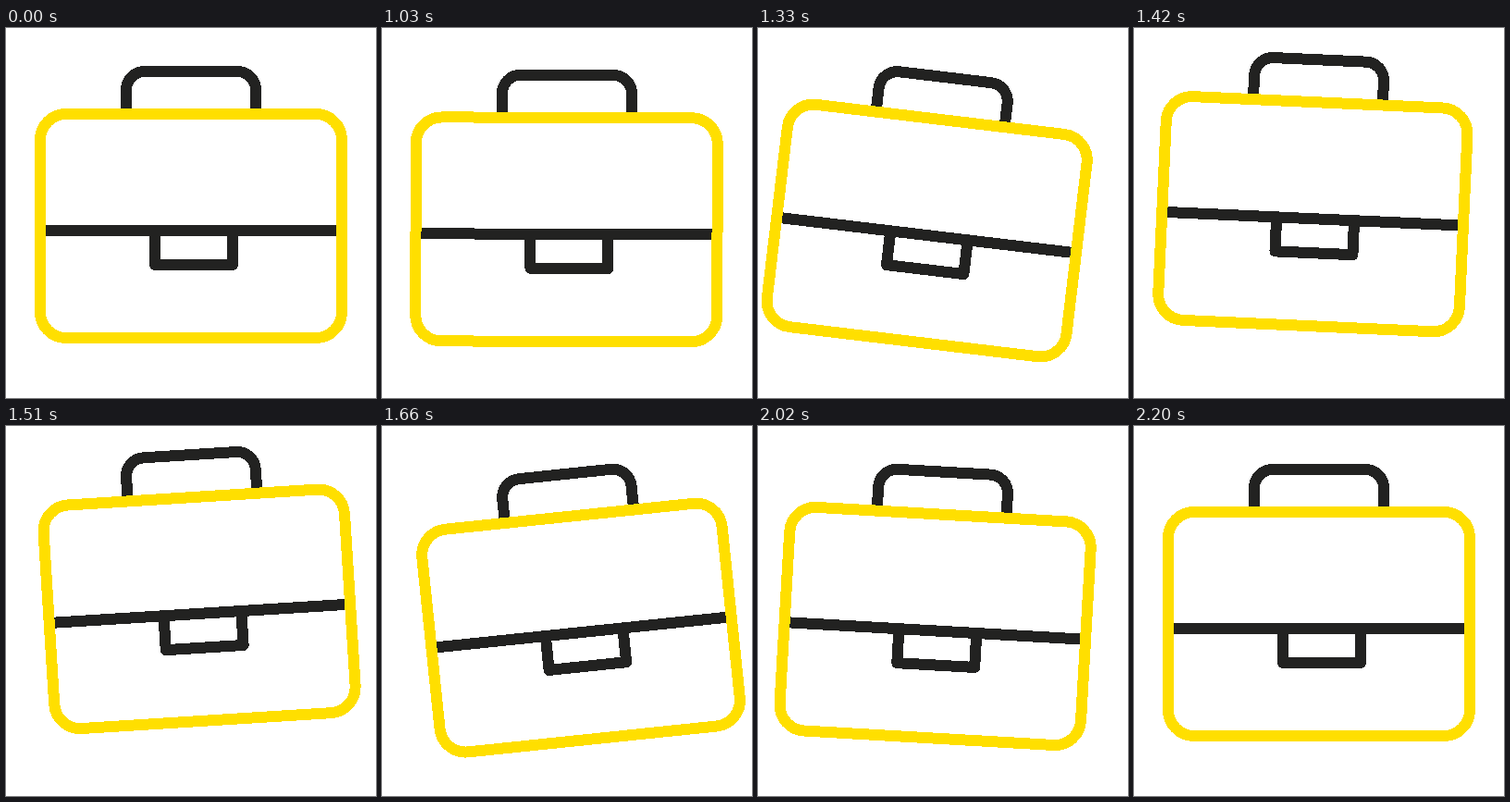
Write an HTML page that moves like this. It is 400 by 400 pixels and loops after 2230 ms.

```html
<!DOCTYPE html>
<html lang="en">
<head>
<meta charset="utf-8">
<title>Briefcase</title>
<style>
  html, body { margin: 0; width: 100%; height: 100%; overflow: hidden; background: #fff; }
  svg { display: block; width: 100%; height: 100%; }
  #case {
    fill: none; stroke: #222221; stroke-width: 12;
    stroke-linecap: round; stroke-linejoin: round;
    shape-rendering: crispEdges;
  }
  .body { stroke: #ffdf00; }
</style>
</head>
<body>
<svg viewBox="0 0 400 400">
  <g id="case">
    <path d="M130 93V67a20 20 0 0 1 20-20H250a20 20 0 0 1 20 20V93"/>
    <path d="M37 219H363"/>
    <path d="M161 219V256H245V219"/>
    <rect class="body" x="37" y="93" width="326" height="242" rx="28"/>
  </g>
</svg>
<script>
  const LOOP = 2230, START = 1030, STEP = 30;

  // [time in ms, value]
  const angle = [[1000, 0], [1310, 7], [1605, -7], [1903, 5], [2200, 0]];
  const drop = [[1004, 0], [1140, 40], [1477, -17], [1772, 15.3], [2110, 0]];

  const ease = p => p * p * (3 - 2 * p);

  function valueAt(keys, t) {
    const i = keys.findIndex(k => k[0] > t);
    if (i < 1) return 0;
    const [t0, a] = keys[i - 1], [t1, b] = keys[i];
    return a + (b - a) * ease((t - t0) / (t1 - t0));
  }

  const bag = document.getElementById('case');
  const begin = performance.now();

  function draw(now) {
    const t = Math.max(0, now - begin) % LOOP;
    // the motion advances in fixed steps after a still hold
    const s = t < START ? 0 : START + Math.floor((t - START) / STEP) * STEP;
    const y = valueAt(drop, s).toFixed(2), a = valueAt(angle, s).toFixed(3);
    bag.setAttribute('transform', `translate(0 ${y}) rotate(${a} 200 68)`);
    requestAnimationFrame(draw);
  }
  draw(begin);
</script>
</body>
</html>
```
